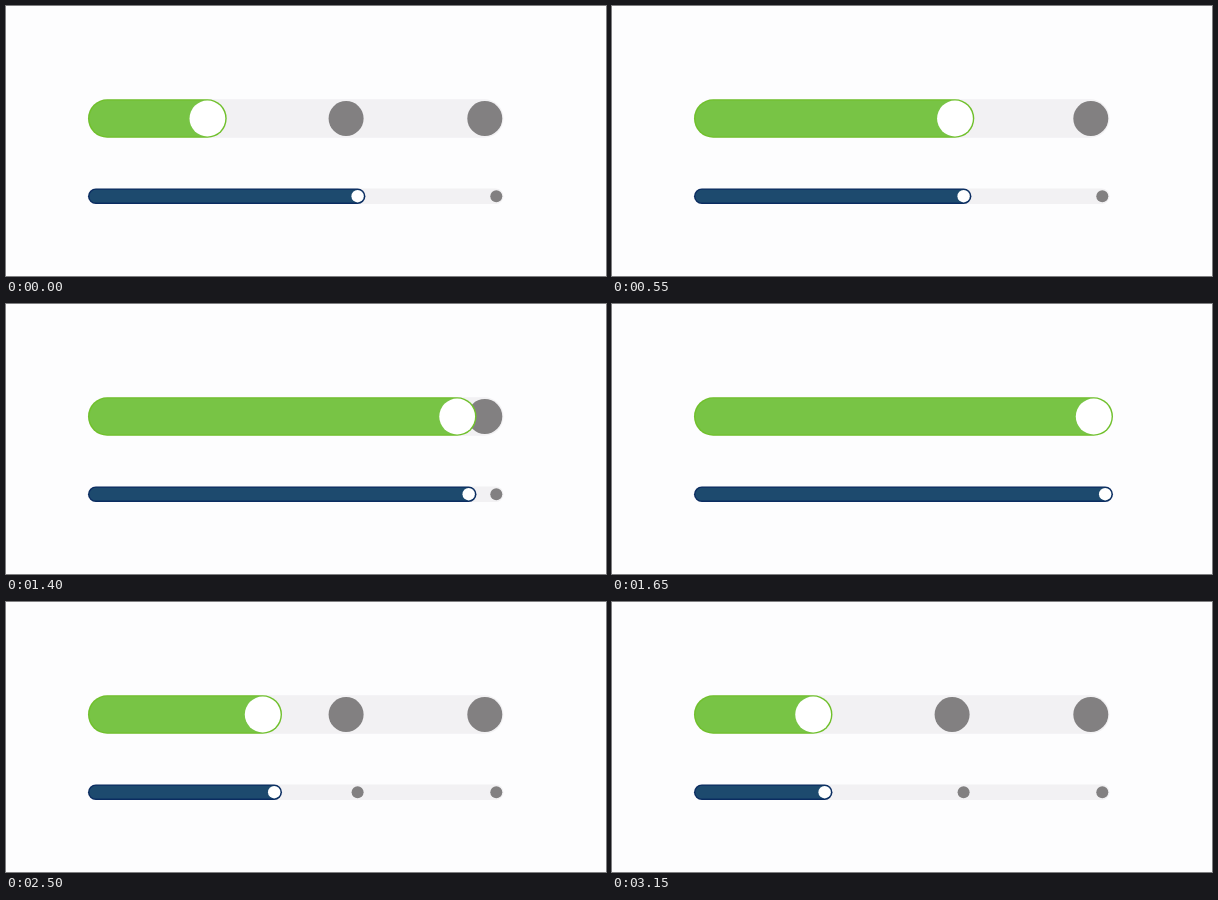
Write an HTML page with a canvas that moves like this. It is 600 px wide and 270 px high and loops after 3.2 s.

```html
<!DOCTYPE html>
<html>
<head>
<meta charset="utf-8">
<style>
  html, body { margin: 0; width: 600px; height: 270px; overflow: hidden; background: #fdfdfe; }
  canvas { display: block; }
</style>
</head>
<body>
<canvas id="stage" width="600" height="270"></canvas>
<script>
const ctx = document.getElementById('stage').getContext('2d');
const LOOP = 3200, TICK = 50;
const LEFT = 82, STEP = 138.7;

// Each move: start time in ms and the stop both bars head for
const MOVES = [[169, 2], [1269, 3], [2369, 1]];

const BARS = [
  { y: 112.5, r: 19.3, knob: 17.9, dot: 17.5, fill: '#78c445', edge: '#70c02b', start: 1 },
  { y: 190.2, r: 7.8, knob: 6.2, dot: 6, fill: '#1d4a6e', edge: '#0b2c61', start: 2 }
];

// Underdamped spring from 0 to 1, overshooting by about a tenth
function spring(ms) {
  const omega = 15.5, zeta = 0.59, root = Math.sqrt(1 - zeta * zeta);
  const t = omega * ms / 1000;
  return 1 - Math.exp(-zeta * t) * (Math.cos(root * t) + zeta / root * Math.sin(root * t));
}

function stopAt(time, start) {
  let from = start, pos = start;
  for (const [begin, to] of MOVES) {
    if (time < begin) break;
    pos = from + (to - from) * spring(time - begin);
    from = to;
  }
  return pos;
}

function pill(y, r, left, right, color) {
  ctx.fillStyle = color;
  ctx.beginPath();
  ctx.roundRect(left, y - r, right - left, 2 * r, r);
  ctx.fill();
}

function disc(x, y, r, color) {
  pill(y, r, x - r, x + r, color);
}

function drawBar(bar, time) {
  const { y, r } = bar;
  const rightOf = stop => LEFT + STEP * stop;
  const end = rightOf(stopAt(time, bar.start));
  pill(y, r, LEFT, rightOf(3) - 0.6, '#f2f1f3');
  for (const stop of [1, 2, 3]) disc(rightOf(stop) - r, y, bar.dot, '#828081');
  pill(y, r, LEFT, end, bar.edge);
  pill(y, r - 1.4, LEFT + 1.4, end - 1.4, bar.fill);
  disc(end - r, y, bar.knob, '#fff');
}

function frame(now) {
  const time = Math.floor(now % LOOP / TICK) * TICK;
  ctx.fillStyle = '#fdfdfe';
  ctx.fillRect(0, 0, 600, 270);
  for (const bar of BARS) drawBar(bar, time);
  requestAnimationFrame(() => frame(performance.now() - began));
}

const began = performance.now();
frame(0);
</script>
</body>
</html>
```
